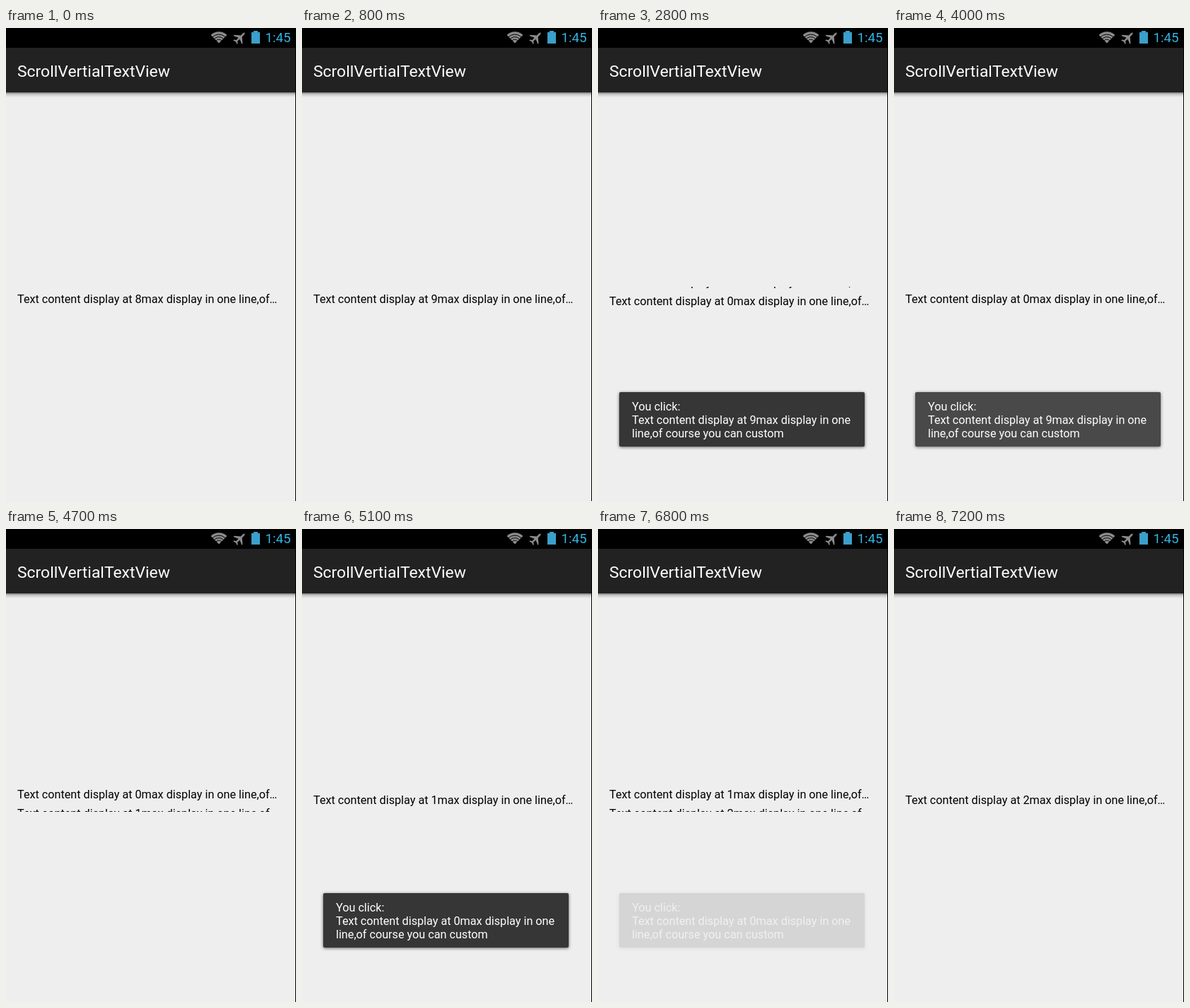
These frames come from a looping animation (410x669 px, 8000 ms). An HTML page with a canvas:

```html
<!DOCTYPE html>
<html lang="en">
<head>
<meta charset="utf-8">
<title>Vertical text scroller</title>
<style>
html, body { margin: 0; width: 100%; height: 100%; overflow: hidden; background: #eee; }
canvas { display: block; width: 410px; height: 669px; }
</style>
</head>
<body>
<canvas id="stage" width="410" height="669"></canvas>
<script>
const ctx = document.getElementById('stage').getContext('2d');
const W = 410, H = 669, LOOP = 8000, STEP = 100;
const BG = 238, TOAST = 54;

const SCROLL = { starts: [250, 2350, 4550, 6650], time: 500, gap: 27 };
const LINES = [8, 9, 0, 1, 2];
const TOASTS = [
  { line: 9, from: 2200, to: 3872 },
  { line: 0, from: 4700, to: 6428 }
];
const FADE_IN = 360, FADE_OUT = 400;

const clamp = x => Math.max(0, Math.min(1, x));
const mix = (a, b, k) => a + (b - a) * k;
const grey = v => { v = Math.round(v); return `rgb(${v},${v},${v})`; };

function rect(x, y, w, h, color) {
  ctx.fillStyle = color;
  ctx.fillRect(x, y, w, h);
}

function text(str, x, y, size, color, align = 'left') {
  ctx.font = `${size}px Roboto, sans-serif`;
  ctx.textAlign = align;
  ctx.fillStyle = color;
  ctx.fillText(str, x, y);
}

function wifi(x, y) {
  const a0 = -Math.PI * 0.745, a1 = -Math.PI * 0.255;
  ctx.fillStyle = '#8c8c8c';
  ctx.beginPath();
  ctx.moveTo(x, y);
  ctx.arc(x, y, 16.3, a0, a1);
  ctx.fill();
  ctx.strokeStyle = '#000';
  ctx.lineWidth = 1;
  for (const r of [5.4, 9, 12.6]) {
    ctx.beginPath();
    ctx.arc(x, y, r, a0 - 0.1, a1 + 0.1);
    ctx.stroke();
  }
}

function plane(x, y) {
  const half = [[0, -10], [1.3, -8], [1.3, -3], [8.4, 3], [8.4, 4.6],
    [1.3, 1.6], [1.1, 6], [4, 8.2], [4, 9.4], [0, 8.2]];
  ctx.save();
  ctx.translate(x, y);
  ctx.rotate(Math.PI / 4);
  ctx.fillStyle = '#8c8c8c';
  ctx.beginPath();
  for (const [px, py] of half) ctx.lineTo(px, py);
  for (const [px, py] of [...half].reverse()) ctx.lineTo(-px, py);
  ctx.fill();
  ctx.restore();
}

function chrome() {
  rect(0, 0, W, H, grey(BG));
  const shade = ctx.createLinearGradient(0, 91, 0, 98);
  shade.addColorStop(0, 'rgba(0,0,0,.5)');
  shade.addColorStop(0.4, 'rgba(0,0,0,.16)');
  shade.addColorStop(1, 'rgba(0,0,0,0)');
  rect(0, 91, W, 7, shade);
  rect(0, 0, W, 28, '#000');
  rect(0, 28, W, 63, '#222');
  wifi(301, 21.6);
  plane(330.7, 13.6);
  rect(350, 4, 6, 2, '#3b9fcb');
  rect(347, 6, 12, 16, '#3b9fcb');
  text('1:45', 402.5, 20, 18.7, '#33b5e5', 'right');
  text('ScrollVertialTextView', 16, 69, 22.9, '#fff');
}

function scroller(t) {
  let pos = 0;
  for (const s of SCROLL.starts) pos += clamp((t - s) / SCROLL.time);
  ctx.save();
  ctx.beginPath();
  ctx.rect(0, 366, W, 34);
  ctx.clip();
  LINES.forEach((n, i) => {
    if (Math.abs(i - pos) < 1) {
      const y = 389 + Math.round((i - pos) * SCROLL.gap);
      text(`Text content display at ${n}max display in one line,of…`, 16, y, 16.2, '#000');
    }
  });
  ctx.restore();
}

function toast({ line, from, to }, t) {
  const rise = 1 - (1 - clamp((t - from) / FADE_IN)) ** 2;
  const fall = 1 - clamp((t - to) / FADE_OUT) ** 2;
  let a = rise * fall;
  if (a <= 0) return;
  if (a > 0.96) a = 1;
  ctx.save();
  ctx.shadowColor = `rgba(0,0,0,${0.6 * a})`;
  ctx.shadowBlur = 4;
  ctx.shadowOffsetY = 1;
  ctx.fillStyle = grey(mix(BG, TOAST, a));
  ctx.beginPath();
  ctx.roundRect(30, 515, 347, 77, 2);
  ctx.fill();
  ctx.restore();
  const rows = ['You click:', `Text content display at ${line}max display in one`,
    'line,of course you can custom'];
  rows.forEach((row, i) => text(row, 48, 541 + i * 19, 16.2, grey(mix(BG, 255, a))));
}

function frame() {
  const t = Math.floor((performance.now() % LOOP) / STEP) * STEP;
  chrome();
  scroller(t);
  for (const item of TOASTS) toast(item, t);
  rect(409, 0, 1, H, '#000');
  requestAnimationFrame(frame);
}
frame();
</script>
</body>
</html>
```
